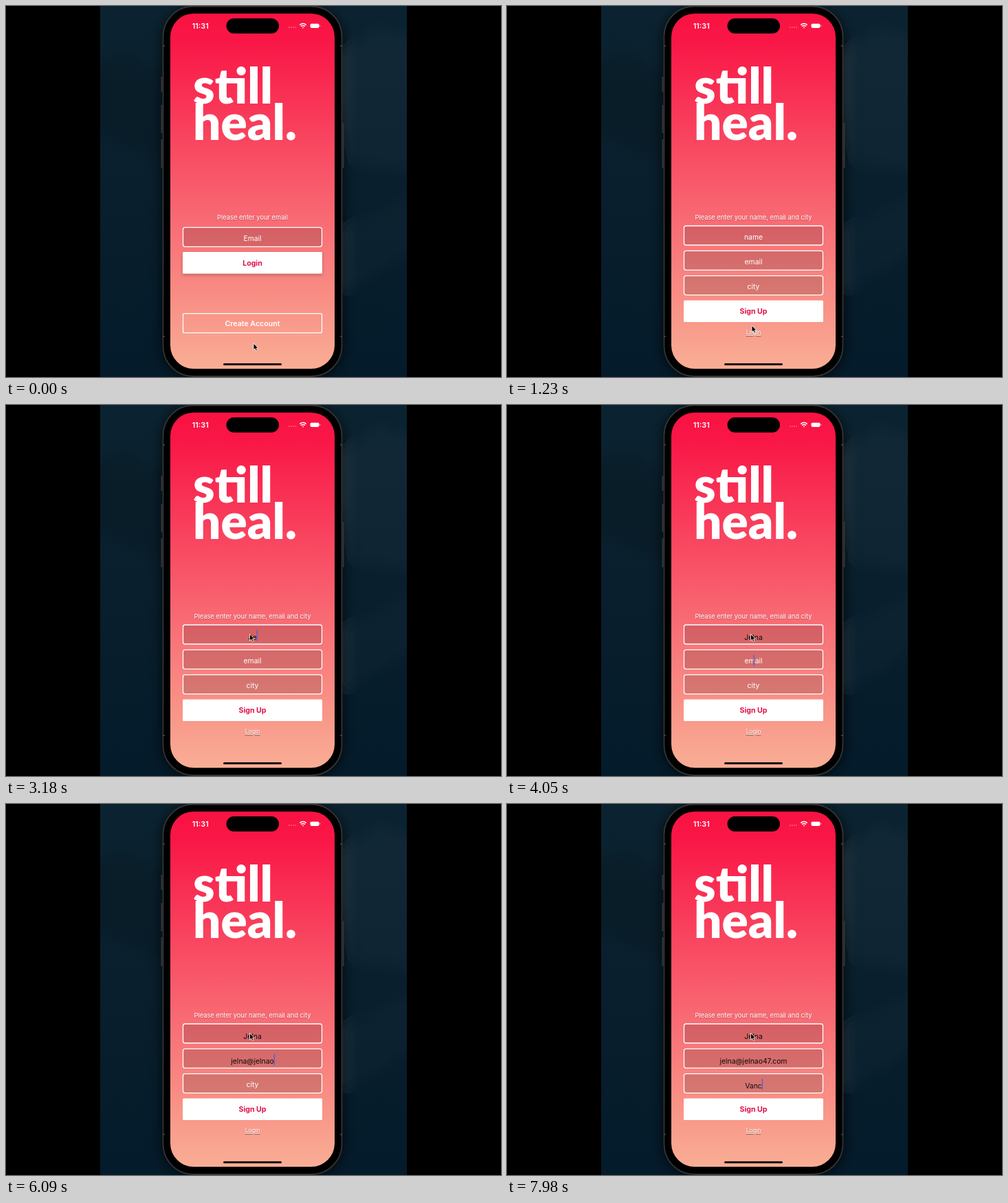
Write an HTML page that moves like this. It is 720 by 540 pixels and loops after 8000 ms.

```html
<!DOCTYPE html>
<html lang="en">
<head>
<meta charset="utf-8">
<title>Sign up</title>
<style>
  html, body { margin: 0; width: 100%; height: 100%; overflow: hidden; background: #000; }
  svg { display: block; width: 720px; height: 540px; font: 10.4px Inter, sans-serif; }
  text { fill: #fff; text-anchor: middle; }
  .wordmark { font: 900 71px Lato, sans-serif; text-anchor: start; }
  .clock { font-size: 10.8px; font-weight: 600; }
  .hint { font-size: 9.3px; text-shadow: 0 1px 1px #0004; }
  .link { font-size: 8.3px; text-decoration: underline; text-shadow: 0 1px 1px #0004; }
  .label { font-size: 10.6px; font-weight: 600; }
  .red { fill: #e0114a; font-weight: 700; }
  .box { fill: #00000024; stroke: #fff; stroke-width: 1.3; }
  .typed { fill: #100a0c; }
</style>
</head>
<body>
<svg viewBox="0 0 720 540">
  <defs>
    <linearGradient id="night" x2="0" y2="1">
      <stop offset="0" stop-color="#0b2331"/>
      <stop offset=".45" stop-color="#091f2d"/>
      <stop offset="1" stop-color="#041b2b"/>
    </linearGradient>
    <linearGradient id="blush" x2="0" y2="1">
      <stop offset="0" stop-color="#f91242"/>
      <stop offset=".08" stop-color="#f91747"/>
      <stop offset=".6" stop-color="#f86e75"/>
      <stop offset="1" stop-color="#f9ae95"/>
    </linearGradient>
    <filter id="soft" x="-30%" y="-30%" width="160%" height="160%">
      <feGaussianBlur stdDeviation="9"/>
    </filter>
    <filter id="drop" x="-10%" y="-20%" width="120%" height="160%">
      <feDropShadow dx="0" dy="2" stdDeviation="2" flood-opacity=".25"/>
    </filter>
    <clipPath id="wall"><path d="M137 0H583V540H137z"/></clipPath>
  </defs>

  <path d="M0 0H720V540H0z"/>
  <g clip-path="url(#wall)">
    <path d="M137 0H583V540H137z" fill="url(#night)"/>
    <g filter="url(#soft)">
      <path d="M120 85L175 65L240 110V230L120 180z" fill="#000" fill-opacity=".12"/>
      <path d="M480 80L540 30L600 50V240L510 230z" fill="#fff" fill-opacity=".025"/>
      <path d="M480 330L600 270V350L490 420z" fill="#fff" fill-opacity=".015"/>
      <rect x="225" y="2" width="267" height="540" rx="46" fill-opacity=".6"/>
    </g>
  </g>

  <path d="M226.5 103V125M226.5 144V185M226.5 194V236M490.5 170V236" stroke="#343537" stroke-width="2"/>
  <rect x="228.5" y=".5" width="260" height="538.5" rx="44" stroke="#343434" stroke-width="1.8"/>
  <path d="M228 58h3M486 58h3M228 481h3M486 481h3" stroke="#4a4a4a" stroke-width="1.5"/>
  <rect x="239" y="11" width="239" height="517" rx="34" fill="url(#blush)"/>
  <rect x="320.5" y="18" width="76.5" height="22" rx="11"/>
  <rect x="316" y="520" width="85" height="3" rx="1.5" fill="#1e1010"/>

  <text class="clock" x="282.7" y="32.5">11:31</text>
  <path d="M411 31h11" stroke="#fff" stroke-opacity=".4" stroke-width="1.6" stroke-dasharray="1.6 1.5"/>
  <g fill="none" stroke="#fff" stroke-width="1.5">
    <path d="M427.3 27.6Q432 23.4 436.7 27.6M429 29.7Q432 27.2 435 29.7"/>
    <path d="M431.2 31.4h1.6"/>
  </g>
  <rect x="442.5" y="25.7" width="13" height="6.2" rx="1.8" fill="#fff"/>
  <path d="M456.8 27.8v2" stroke="#fff" stroke-opacity=".6"/>

  <text class="wordmark" x="272" y="142">still</text>
  <text class="wordmark" x="272" y="195">heal.</text>

  <g id="login">
    <text class="hint" x="358.5" y="310.7">Please enter your email</text>
    <rect class="box" x="257.5" y="322.3" width="202" height="28" rx="3"/>
    <text x="358.5" y="342">Email</text>
    <rect x="257" y="358" width="203" height="31.5" rx="1.5" fill="#fff" filter="url(#drop)"/>
    <text class="label red" x="358.5" y="377.8">Login</text>
    <rect class="box" style="fill:none" x="257.5" y="447.7" width="202" height="28" rx="2"/>
    <text class="label" x="358.5" y="465.8">Create Account</text>
  </g>

  <g id="signup">
    <text class="hint" x="358.5" y="310.7">Please enter your name, email and city</text>
    <g id="fields"></g>
    <rect x="257" y="428.5" width="203" height="31.5" rx="1.5" fill="#fff"/>
    <text class="label red" x="358.5" y="448">Sign Up</text>
    <text class="link" x="358.5" y="478">Login</text>
    <rect id="caret" width="1.3" height="16" fill="#4660e0"/>
  </g>

  <path id="cursor" d="M0 0V9.6L2.2 7.6L3.8 11L5.5 10.2L4 7H6.9z" stroke="#fff" stroke-width=".8"/>
</svg>
<script>
const LOOP = 8000, SIGNUP_AT = 1230, CENTER = 358.5;
const $ = id => document.getElementById(id);

// Each key time reveals one more character of the value.
const fields = [
  { hint: 'name', value: 'Jelna', top: 320, focus: 2430,
    keys: [2970, 3120, 3270, 3400, 3530] },
  { hint: 'email', value: 'jelna@jelnao47.com', top: 356.3, focus: 3840,
    keys: [4080, 4200, 4320, 4440, 4560, 5130, 5400, 5530, 5660, 5790,
           5920, 6060, 6360, 6510, 6660, 6780, 6880, 6980] },
  { hint: 'city', value: 'Vanc', top: 392.6, focus: 7200,
    keys: [7440, 7560, 7700, 7860] },
];

$('fields').innerHTML = fields.map(f => `
  <rect class="box" x="257.5" y="${f.top}" width="202" height="28" rx="3"/>
  <text class="entry" x="${CENTER}"></text>`).join('');
document.querySelectorAll('.entry').forEach((node, i) => fields[i].node = node);

// Pointer moves: start, end, from, to.
const moves = [
  [480, 930, [360, 491], [356, 465]],
  [1310, 2030, [356, 465], [354.5, 333.5]],
];

function pointerAt(t) {
  const [start, end, from, to] = t < SIGNUP_AT ? moves[0] : moves[1];
  const u = Math.min(1, Math.max(0, (t - start) / (end - start)));
  const eased = u * u * (3 - 2 * u);
  return from.map((v, i) => v + (to[i] - v) * eased);
}

function blink(idle) {
  return idle < 300 ? 1 : 0.5 + 0.5 * Math.cos((idle - 300) / 500 * Math.PI);
}

function drawField(f, t) {
  const count = f.keys.filter(k => k <= t).length;
  f.node.textContent = count ? f.value.slice(0, count) : f.hint;
  f.node.setAttribute('class', count ? 'entry typed' : 'entry');
  f.node.setAttribute('y', f.top + (count ? 21.7 : 19.7));
  return count;
}

function draw(t) {
  const signup = t >= SIGNUP_AT;
  $('login').style.display = signup ? 'none' : '';
  $('signup').style.display = signup ? '' : 'none';
  $('cursor').setAttribute('transform', `translate(${pointerAt(t)})`);
  if (!signup) return;

  const caret = $('caret');
  caret.setAttribute('opacity', 0);
  for (const f of fields) {
    const count = drawField(f, t);
    if (t < f.focus) continue;
    const width = count ? f.node.getComputedTextLength() : 0;
    caret.setAttribute('x', CENTER + width / 2);
    caret.setAttribute('y', f.top + 7.5);
    caret.setAttribute('opacity', blink(t - (count ? f.keys[count - 1] : f.focus)));
  }
}

function tick() {
  draw(performance.now() % LOOP);
  requestAnimationFrame(tick);
}
tick();
</script>
</body>
</html>
```
